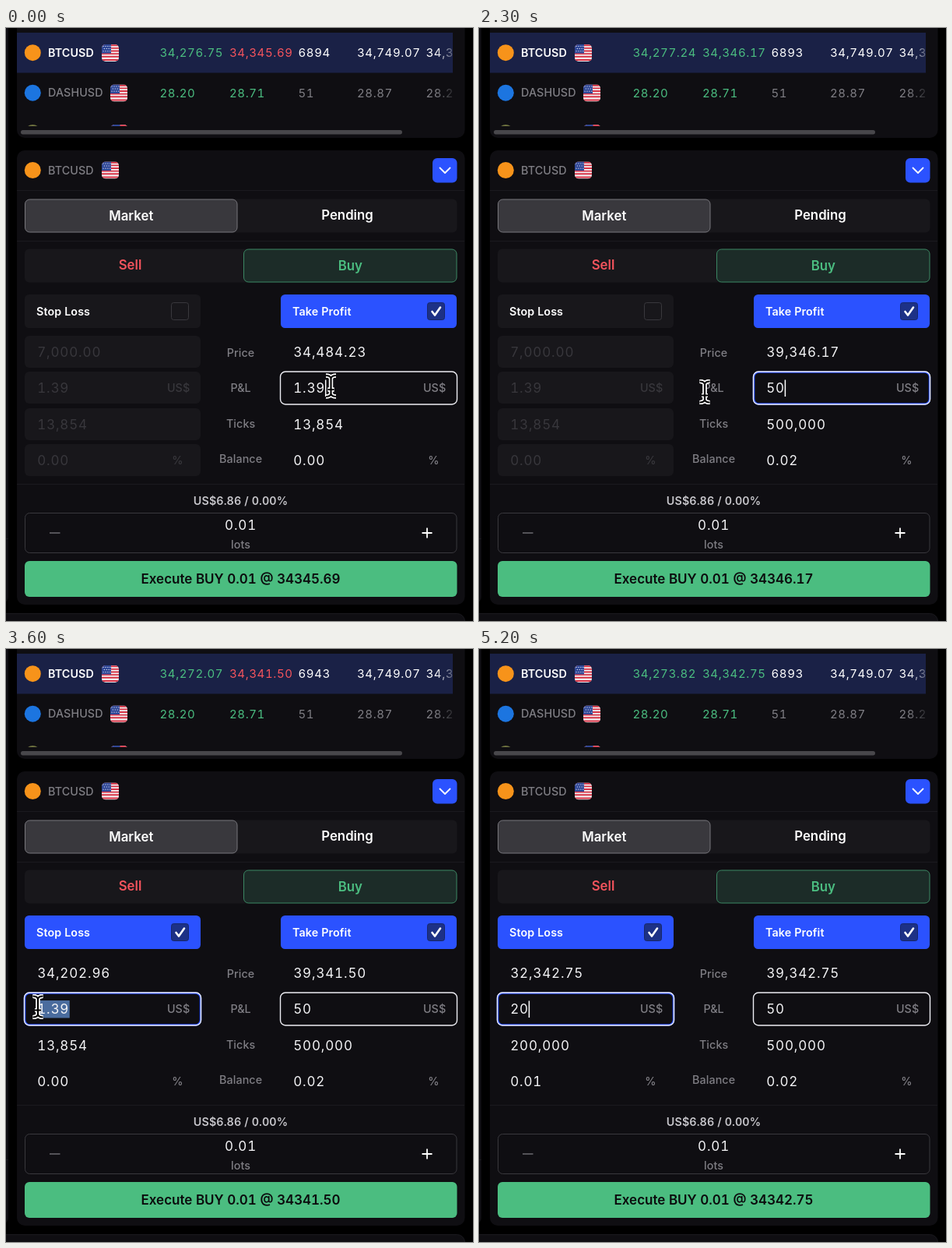
These frames come from a looping animation (600 px wide and 761 px high, 5300 ms). An HTML page:

```html
<!DOCTYPE html>
<html lang="en">
<head>
<meta charset="utf-8">
<title>Trade ticket</title>
<style>
html, body { margin: 0; width: 100%; height: 100%; overflow: hidden; background: #000; }
svg { display: block; width: 600px; height: 761px; }
text {
  font: 500 14.3px Inter, sans-serif;
  font-variant-numeric: tabular-nums;
  letter-spacing: .1px;
  fill: #7f7e84;
  white-space: pre;
}
.num { font-size: 15px; font-weight: 400; letter-spacing: .6px; }
.val { font-size: 17px; font-weight: 400; letter-spacing: .85px; fill: #f4f4f6; }
.bold { font-weight: 600; }
.tab { font-size: 16.8px; font-weight: 600; letter-spacing: 0; }
.mid { text-anchor: middle; }
.end { text-anchor: end; }
.white { fill: #fff; }
.up { fill: #4bbd80; }
.down { fill: #f4545d; }
.panel { fill: #0f0e12; }
.box { fill: #18171b; }
.blue { fill: #2b52ff; }
.line { fill: none; stroke: #1b1a1f; }
.off text { fill: #38373c; }
</style>
</head>
<body>
<svg viewBox="0 0 600 761">
  <defs>
    <linearGradient id="fade" gradientUnits="userSpaceOnUse" x1="552" x2="576" y1="0" y2="0">
      <stop stop-color="#fff"/><stop offset="1" stop-color="#333"/>
    </linearGradient>
    <mask id="edge" maskUnits="userSpaceOnUse" x="0" y="0" width="574" height="130">
      <rect width="574" height="130" fill="url(#fade)"/>
    </mask>
    <clipPath id="rows"><rect width="574" height="126"/></clipPath>
    <clipPath id="round"><rect width="22" height="22" rx="5"/></clipPath>
    <g id="flag" clip-path="url(#round)">
      <rect width="22" height="22" fill="#f3eef0"/>
      <path d="M0 1.3H22M0 4.9H22M0 8.5H22M0 12.1H22M0 15.7H22M0 20H22" stroke="#d63346" stroke-width="1.9"/>
      <rect width="12" height="11.5" fill="#2f4796"/>
      <path d="M1.5 2.5H12M2.8 5.5H12M1.5 8.7H12" stroke="#dfe4f4" stroke-dasharray="1.2 1.7"/>
    </g>
    <g id="beam">
      <path id="beamPath" d="M-6.5 -13.5Q-1 -13.5 0 -10Q1 -13.5 6.5 -13.5M-6.5 13.5Q-1 13.5 0 10Q1 13.5 6.5 13.5M0 -10V10M-4 4.5H4"
        fill="none" stroke="#fff" stroke-width="5.2" stroke-linejoin="round"/>
      <use href="#beamPath"/>
      <path d="M-6.5 -13.5Q-1 -13.5 0 -10Q1 -13.5 6.5 -13.5M-6.5 13.5Q-1 13.5 0 10Q1 13.5 6.5 13.5M0 -10V10M-4 4.5H4"
        fill="none" stroke="#000" stroke-width="2.2"/>
    </g>
    <path id="arrow" d="M0 0V25L5.7 19.7L9.7 29L14 27.2L10 18H17.7Z" fill="#000" stroke="#fff" stroke-width="2" stroke-linejoin="round"/>
  </defs>

  <rect class="panel" x="-20" y="-20" width="23" height="758" rx="8"/>
  <path class="line" d="M0 655.5H3"/>
  <rect class="panel" x="14" y="-20" width="575.5" height="161" rx="10"/>
  <rect class="panel" x="14" y="157" width="575.5" height="583" rx="10"/>
  <rect class="panel" x="-20" y="751.5" width="609.5" height="40" rx="10" stroke="#1b1a1f"/>

  <rect x="14" y="6" width="560" height="51.5" fill="#1a2146"/>
  <circle cx="34.3" cy="31.7" r="10.5" fill="#f7931a"/>
  <circle cx="34.3" cy="83.2" r="10.5" fill="#1c75e0"/>
  <text class="bold white" x="54" y="36.8">BTCUSD</text>
  <text x="54" y="88.3">DASHUSD</text>
  <use href="#flag" x="123" y="21"/>
  <use href="#flag" x="134" y="72.5"/>
  <g clip-path="url(#rows)">
    <circle cx="34.3" cy="134.5" r="10.5" fill="#6f7340"/>
    <use href="#flag" x="134.5" y="124"/>
  </g>
  <g id="quotes" mask="url(#edge)"></g>
  <rect x="19" y="131" width="490" height="5.5" rx="2.7" fill="#48474b"/>

  <circle cx="34.3" cy="182.5" r="10.5" fill="#f7931a"/>
  <text x="54" y="187.7">BTCUSD</text>
  <use href="#flag" x="123" y="171.5"/>
  <rect class="blue" x="548" y="167" width="31.5" height="31.5" rx="6"/>
  <path d="M557.5 179.5L564 186L570.5 179.5" fill="none" stroke="#fff" stroke-width="1.8" stroke-linecap="round" stroke-linejoin="round"/>
  <path class="line" d="M14 208.5H589M14 273.5H589M14 585.5H589"/>

  <rect class="box" x="24" y="219.5" width="555.5" height="43" rx="6"/>
  <rect x="24.5" y="220" width="272.5" height="42" rx="6" fill="#39383d" stroke="#77767c"/>
  <text class="tab mid white" x="160.8" y="246.5">Market</text>
  <text class="tab mid white" x="438.5" y="246.3">Pending</text>
  <rect class="box" x="24" y="283.5" width="555.5" height="43" rx="6"/>
  <rect x="305.5" y="284" width="273.5" height="42" rx="6" fill="#1c2c28" stroke="#3b8763"/>
  <text class="tab mid down" x="159.5" y="310.4">Sell</text>
  <text class="tab mid up" x="442.3" y="310.8">Buy</text>

  <g id="labels"></g>
  <g id="fields"></g>

  <text class="bold mid" x="301.5" y="611.8" style="fill:#c6c5ca">US$6.86 / 0.00%</text>
  <rect x="24.5" y="622.5" width="554.5" height="51" rx="6" fill="none" stroke="#39383d"/>
  <path d="M56 648H69.5" stroke="#66656a" stroke-width="1.6"/>
  <path d="M534.5 648H547.5M541 641.5V654.5" stroke="#fff" stroke-width="1.8"/>
  <text class="val mid" x="301.6" y="644.2">0.01</text>
  <text class="mid" x="301.5" y="668">lots</text>
  <rect x="24" y="684" width="555.5" height="46" rx="6" fill="#4bbd80"/>
  <text id="execute" class="mid" x="301.5" y="713.2" style="font-size:17px;font-weight:600;letter-spacing:0;fill:#0b0b0d"></text>

  <use id="pointer"/>
</svg>
<script>
const NS = "http://www.w3.org/2000/svg";
const $ = id => document.getElementById(id);

function add(parent, tag, attrs, content) {
  const el = document.createElementNS(NS, tag);
  for (const key in attrs) el.setAttribute(key, attrs[key]);
  if (content) el.textContent = content;
  return parent.appendChild(el);
}
const set = (el, attrs) => { for (const key in attrs) el.setAttribute(key, attrs[key]); };
const show = (el, on) => set(el, { visibility: on ? "visible" : "hidden" });
const money = (n, digits = 2) =>
  n.toLocaleString("en-US", { minimumFractionDigits: digits, maximumFractionDigits: digits });

// Quote table
const columns = [197.5, 287, 375.5, 451, 539.5];
function quoteRow(y, values, classes) {
  return columns.map((x, i) => add($("quotes"), "text", { x, y, class: "num " + classes[i] }, values[i]));
}
const btc = quoteRow(37, ["", "", "", "34,749.07", "34,345"], ["up", "up", "white", "white", "white"]);
quoteRow(88.5, ["28.20", "28.71", "51", "28.87", "28.20"], ["up", "up", "", "", ""]);

// Order fields
[["Price", 421.8], ["P&L", 467.2], ["Ticks", 512.8], ["Balance", 558]].forEach(([name, y]) =>
  add($("labels"), "text", { class: "mid", x: 301.6, y }, name));

function makeSide(x, title) {
  const g = add($("fields"), "g", { transform: `translate(${x} 0)` });
  const head = add(g, "rect", { x: 0, y: 342, width: 226, height: 43, rx: 5.5 });
  add(g, "text", { class: "bold", x: 15, y: 368.6, style: "fill:#fff" }, title);
  const check = add(g, "rect", { x: 188.5, y: 352.5, width: 22, height: 22, rx: 3 });
  const tick = add(g, "path", { d: "M194.5 364L198 368.5L205 358.5", fill: "none", stroke: "#fff",
    "stroke-width": 2.6, "stroke-linecap": "round", "stroke-linejoin": "round" });
  const back = [395, 441, 488, 534].map(y =>
    add(g, "rect", { class: "box", x: 0, y, width: 226, height: 41, rx: 6 }));
  const glow = add(g, "rect", { x: 0, y: 441.5, width: 226, height: 41, rx: 6.5, fill: "none" });
  const ring = add(g, "rect", { x: -.5, y: 441, width: 227, height: 42, rx: 6.5, fill: "none" });
  const mark = add(g, "rect", { y: 451, height: 22.5, fill: "#4a6c9e" });
  const values = [422.3, 468.4, 514.8, 561].map(y => add(g, "text", { class: "val", x: 16.2, y }));
  add(g, "text", { class: "end", x: 212.3, y: 467.2 }, "US$");
  add(g, "text", { class: "end", x: 203.5, y: 559.8 }, "%");
  const caret = add(g, "rect", { y: 451.5, width: 1.5, height: 21.5, fill: "#fff" });

  return s => {
    set(g, { class: s.on ? "" : "off" });
    set(head, { class: s.on ? "blue" : "box" });
    set(check, { fill: s.on ? "#1d3186" : "none", stroke: s.on ? "#16266c" : "#39383d" });
    show(tick, s.on);
    back.forEach(el => show(el, !s.on));
    show(glow, s.focus);
    set(glow, { stroke: "#2b52ff", "stroke-width": s.on ? 2.6 : 1.4 });
    show(ring, s.on);
    set(ring, { stroke: "#eeeef4", "stroke-width": 1.4 });
    s.values.forEach((v, i) => {
      values[i].textContent = v;
      values[i].style.fill = s.on ? "" : "#38373c";
    });
    const end = 16.2 + values[1].getComputedTextLength();
    show(mark, s.from != null);
    if (s.from != null) set(mark, { x: s.from, width: Math.max(0, end + .5 - s.from) });
    show(caret, s.caret);
    set(caret, { x: end - .3 });
  };
}
const drawStop = makeSide(24, "Stop Loss");
const drawProfit = makeSide(353, "Take Profit");

// [start, bid, ask, last column, ask class]
const ticks = [
  [0, 34276.75, 34345.69, 6894, "down"],
  [400, 34277.24, 34346.17, 6893, "up"],
  [2800, 34272.07, 34341.50, 6943, "down"],
  [4700, 34273.82, 34342.75, 6893, "up"]
];
const profits = [[0, "1.39"], [1700, "5"], [1900, "50"]];
const stops = [[0, "1.39"], [4700, "2"], [4900, "20"]];
// [time, x, y, shape]
const path = [
  [0, 417.5, 459.5, "beam"], [100, 417.5, 459.5, "beam"], [400, 354, 461, "beam"],
  [500, 330, 461, "arrow"], [1700, 330, 461, ""], [2100, 290, 467, "beam"],
  [2300, 290, 467, "beam"], [2800, 86, 460, "beam"], [2900, 86, 460, "beam"],
  [3200, 41, 459, "beam"], [3600, 41, 459, "beam"], [4100, 121, 459, "beam"],
  [4700, 121, 459, ""], [5300, 121, 459, ""]
];
const last = (list, t) => list.filter(k => k[0] <= t).pop();

function pointerAt(t) {
  const i = path.indexOf(last(path, t));
  const a = path[i], b = path[i + 1] || a;
  const u = b === a || !a[3] ? 0 : (t - a[0]) / (b[0] - a[0]);
  const k = u * u * (3 - 2 * u);
  return { x: a[1] + (b[1] - a[1]) * k, y: a[2] + (b[2] - a[2]) * k, shape: a[3] };
}

// Values that follow from the typed profit or loss
function derive(ask, typed, sign) {
  const count = typed === "1.39" ? 13854 : typed * 10000;
  return [money(ask + sign * count / 100), typed, money(count, 0), money(typed * .0004)];
}

// Left edge of a selection dragged to x, snapped between characters
function dragEdge(x) {
  return [16, 28, 33.5, 45, 57].reduce((a, b) => Math.abs(b - x) < Math.abs(a - x) ? b : a);
}

function draw(t) {
  const [, bid, ask, size, trend] = last(ticks, t);
  btc[0].textContent = money(bid);
  btc[1].textContent = money(ask);
  set(btc[1], { class: "num " + trend });
  btc[2].textContent = size;
  $("execute").textContent = "Execute BUY 0.01 @ " + ask.toFixed(2);

  const p = pointerAt(t);
  const profit = last(profits, t)[1], stop = last(stops, t)[1];
  const blink = t % 1000 < 500;
  const stopOn = t >= 3500;

  drawProfit({
    on: true,
    focus: t >= 200 && t < 2900,
    from: t >= 200 && t < 1700 ? dragEdge(p.x - 353) : null,
    caret: t < 200 || t >= 1700 && t < 2900 && (t < 2400 || blink),
    values: derive(ask, profit, 1)
  });
  drawStop({
    on: stopOn,
    focus: t >= 2900,
    from: t >= 3000 && t < 4700 ? dragEdge(t < 3200 ? p.x - 24 : 16) : null,
    caret: t >= 4700,
    values: stopOn ? derive(ask, stop, -1) : ["7,000.00", "1.39", "13,854", "0.00"]
  });

  show($("pointer"), p.shape);
  if (p.shape) set($("pointer"), { href: "#" + p.shape, transform: `translate(${p.x} ${p.y})` });
}

// The screen refreshes ten times a second
const start = performance.now();
function loop() {
  const t = (performance.now() - start) % 5300;
  draw(Math.floor(t / 100) * 100);
  requestAnimationFrame(loop);
}
loop();
</script>
</body>
</html>
```
